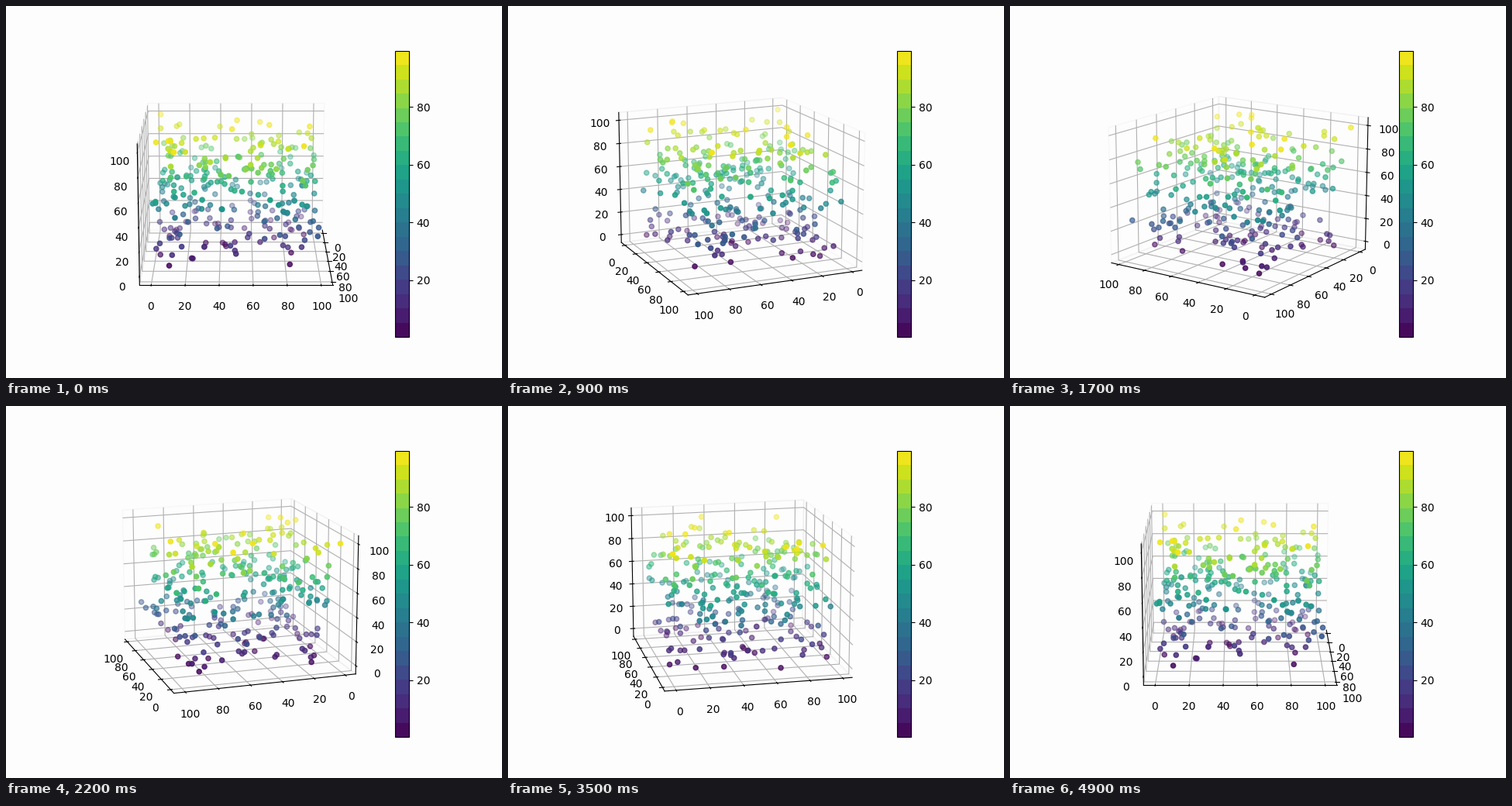
Recreate the animation shown at these times as a matplotlib script. Size 640 by 480 pixels, loop 5 s.

```python
import numpy as np
import matplotlib.pyplot as plt
from matplotlib.animation import FuncAnimation
from matplotlib.colors import ListedColormap

FRAMES = 50
POINTS = 300
BANDS = 20
BACKGROUND = "#fdfdfd"
# Data extent along x, y and z.
LOW = np.array([0.4, 0.4, 0.2])
HIGH = np.array([98.6, 99.6, 99.5])

plt.rcParams["font.family"] = "DejaVu Sans"


def make_cloud(seed=42):
    """Uniform random points that fill the data extent exactly."""
    cloud = np.random.default_rng(seed).random((POINTS, 3))
    cloud = (cloud - cloud.min(axis=0)) / np.ptp(cloud, axis=0)
    return (LOW + cloud * (HIGH - LOW)).T


fig = plt.figure(figsize=(6.4, 4.8), dpi=100, facecolor=BACKGROUND)
ax = fig.add_subplot(projection="3d", facecolor=BACKGROUND)

banded = ListedColormap(plt.get_cmap("viridis")((np.arange(BANDS) + 0.5) / BANDS))
x, y, z = make_cloud()
points = ax.scatter(x, y, z, c=z, cmap=banded)
fig.colorbar(points)

# A 5 % margin around the data, then 1/48 of the widened range.
pad = (HIGH - LOW) * (0.05 + 1.1 / 48)
xlim, ylim, zlim = zip(LOW - pad, HIGH + pad)
ax.set(xlim=xlim, ylim=ylim, zlim=zlim)
for axis in (ax.xaxis, ax.yaxis, ax.zaxis):
    axis.pane.fill = False


def rotate(frame):
    ax.view_init(elev=15, azim=360 * frame / (FRAMES - 1))
    return (points,)


anim = FuncAnimation(fig, rotate, frames=FRAMES, interval=100,
                     init_func=lambda: rotate(0), repeat=True, repeat_delay=0)
plt.show()
```
